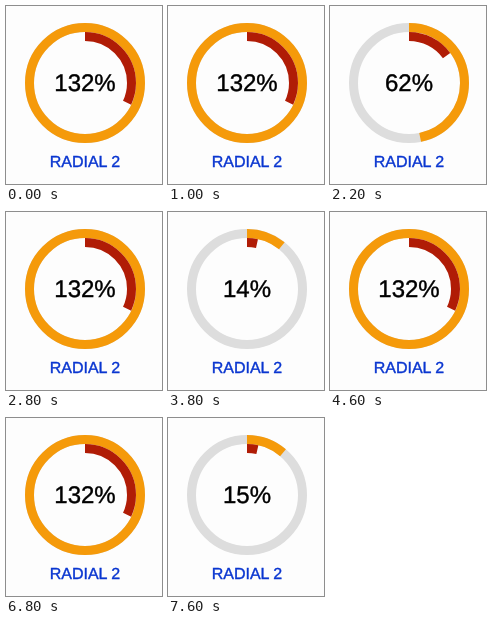
An HTML page that plays this animation: 156x178 px, repeating every 7800 ms.

```html
<!DOCTYPE html>
<html lang="en">
<head>
<meta charset="utf-8">
<title>Radial progress</title>
<style>
  html, body { margin: 0; width: 100%; height: 100%; overflow: hidden; background: #fdfdfd; }
  svg { display: block; }
  circle { fill: none; stroke-width: 9; }
  text {
    font-family: "Liberation Sans", Arial, Helvetica, sans-serif;
    text-anchor: middle;
    text-rendering: geometricPrecision;
    stroke-width: 0.4;
  }
</style>
</head>
<body>
<svg width="156" height="178" viewBox="0 0 156 178">
  <g transform="translate(79 77) rotate(-90)">
    <circle r="55.5" stroke="#ddd"/>
    <circle id="outer" r="55.5" stroke="#f59a0a" pathLength="360"/>
    <circle id="inner" r="46.5" stroke="#b01c06" pathLength="360"/>
  </g>
  <text id="value" x="79" y="85" font-size="24" stroke="#000"></text>
  <text x="79" y="161" font-size="16" fill="#0a36d0" stroke="#0a36d0">RADIAL 2</text>
</svg>
<script>
  const LOOP = 7800, STEP = 200, TARGET = 132;
  // Each run restarts the dial from zero: [start, duration] in ms
  const RUNS = [[500, 480], [1500, 1000], [1711, 1000], [3500, 1000], [5643, 1000], [7296, 1000]];

  const outer = document.getElementById('outer');
  const inner = document.getElementById('inner');
  const label = document.getElementById('value');

  const cubicInOut = t => t < 0.5 ? 4 * t ** 3 : 1 - 4 * (1 - t) ** 3;

  function progress(time) {
    const run = RUNS.filter(([start]) => start <= time).pop();
    return run ? cubicInOut(Math.min(1, (time - run[0]) / run[1])) : 1;
  }

  function setArc(arc, degrees) {
    arc.style.visibility = degrees > 0 ? 'visible' : 'hidden';
    arc.setAttribute('stroke-dasharray', degrees >= 360 ? 'none' : degrees + ' 720');
  }

  function draw(ms) {
    const time = Math.floor((ms % LOOP) / STEP) * STEP;
    const p = progress(time);
    setArc(outer, 360 * p);
    setArc(inner, 3.6 * (TARGET - 100) * p);
    label.textContent = Math.round(TARGET * p) + '%';
  }

  const origin = performance.now();
  function tick() {
    draw(performance.now() - origin);
    requestAnimationFrame(tick);
  }
  tick();
</script>
</body>
</html>
```
